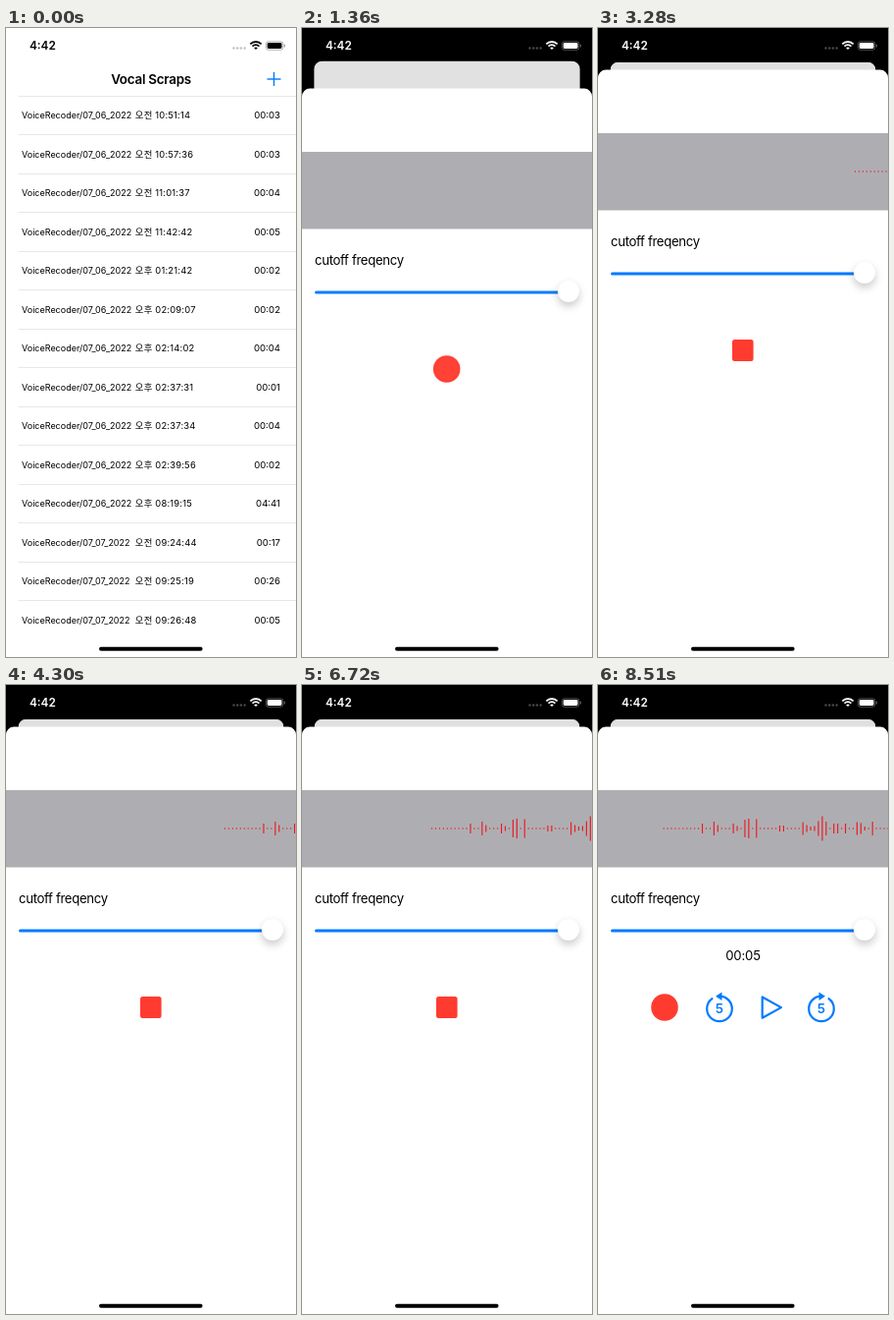
Animation of 296x640 px, one loop 8.62 s. Source, as an HTML page with a canvas:

```html
<!DOCTYPE html>
<html lang="en">
<head>
<meta charset="utf-8">
<title>Recorder</title>
<style>
html, body { margin: 0; height: 100%; overflow: hidden; background: #000; }
canvas { display: block; }
</style>
</head>
<body>
<canvas id="stage" width="296" height="640"></canvas>
<script>
const W = 296, H = 640, LOOP = 8620;
const ROW = 39.47, GAP = 3.947, SHEET_TOP = 42.6, CARD_TOP = 34.7;
const BLUE = '#007aff', RED = '#ff3b30';
const FONT = 'Inter, "Noto Sans CJK KR", "Noto Sans CJK", sans-serif';
const ctx = document.getElementById('stage').getContext('2d');

const memos = `06 오전 10:51:14 00:03
06 오전 10:57:36 00:03
06 오전 11:01:37 00:04
06 오전 11:42:42 00:05
06 오후 01:21:42 00:02
06 오후 02:09:07 00:02
06 오후 02:14:02 00:04
06 오후 02:37:31 00:01
06 오후 02:37:34 00:04
06 오후 02:39:56 00:02
06 오후 08:19:15 04:41
07 오전 09:24:44 00:17
07 오전 09:25:19 00:26
07 오전 09:26:48 00:05`.split('\n').map(line => line.split(' '));

// Loud samples by index; all others are drawn as dots
const peaks = {
  10: 10, 13: 14, 14: 7, 18: 10, 19: 5, 21: 18, 22: 20, 24: 19, 30: 6, 31: 6,
  36: 13, 37: 7, 38: 4, 39: 5, 40: 15, 41: 25, 42: 14, 44: 10, 45: 10,
  47: 10, 50: 13, 51: 11, 52: 4, 54: 14
};

function text(str, x, y, size, { align = 'left', weight = 400, color = '#000', spacing = 0 } = {}) {
  ctx.font = `${weight} ${size}px ${FONT}`;
  ctx.letterSpacing = spacing + 'px';
  ctx.textAlign = align;
  ctx.fillStyle = color;
  ctx.fillText(str, x, y);
}

function box(x, y, w, h, r, color) {
  ctx.fillStyle = color;
  ctx.beginPath();
  ctx.roundRect(x, y, w, h, r);
  ctx.fill();
}

function disc(x, y, r, color) {
  ctx.fillStyle = color;
  ctx.beginPath();
  ctx.arc(x, y, r, 0, 7);
  ctx.fill();
}

function arc(x, y, r, from, to) {
  ctx.beginPath();
  ctx.arc(x, y, r, from * Math.PI / 180, to * Math.PI / 180);
  ctx.stroke();
}

function poly(...points) {
  ctx.beginPath();
  points.forEach(([x, y]) => ctx.lineTo(x, y));
  ctx.closePath();
}

function statusBar(color) {
  text('4:42', 24, 22, 11.8, { weight: 600, color });
  for (let i = 0; i < 4; i++) disc(232.5 + i * 3.7, 20.5, 1.2, '#8888');
  ctx.strokeStyle = color;
  ctx.lineWidth = 1.8;
  arc(255, 22, 8, -135, -45);
  arc(255, 22, 4.9, -135, -45);
  ctx.lineWidth = 2.6;
  arc(255, 22, 1.3, -135, -45);
  ctx.globalAlpha = 0.4;
  ctx.lineWidth = 0.8;
  ctx.beginPath();
  ctx.roundRect(265.4, 13.8, 17.4, 8.4, 2.4);
  ctx.stroke();
  box(283.8, 16.4, 1.1, 3.2, 0.6, color);
  ctx.globalAlpha = 1;
  box(266.7, 15, 14.8, 6, 1.4, color);
}

function memoList(p, pressed) {
  const scale = 1 - 0.0853 * p;
  ctx.save();
  ctx.translate(W * (1 - scale) / 2, CARD_TOP * p);
  ctx.scale(scale, scale);
  ctx.beginPath();
  ctx.roundRect(0, 0, W, H, p ? 31 - 22.4 * p : 0);
  ctx.clip();
  ctx.fillStyle = '#fff';
  ctx.fillRect(0, 0, W, H);
  text('Vocal Scraps', W / 2, 56.5, 13.4, { align: 'center', weight: 600, spacing: -0.25 });

  ctx.globalAlpha = pressed ? 0.35 : 1;
  ctx.fillStyle = BLUE;
  ctx.fillRect(266.5, 51.3, 14, 1.4);
  ctx.fillRect(272.8, 45, 1.4, 14);
  ctx.globalAlpha = 1;

  memos.forEach(([day, half, time, length], i) => {
    const y = 69 + i * ROW;
    ctx.fillStyle = '#e2e2e4';
    ctx.fillRect(12.6, Math.round(y), W, 0.8);
    text(`VoiceRecoder/07_${day}_2022`, 16, y + 23.4, 9);
    text(`${half} ${time}`, 131.8, y + 23.4, 9.4, { spacing: 0.2 });
    text(length, 280, y + 23.4, 9.6, { align: 'right' });
  });
  ctx.fillStyle = `rgba(0, 0, 0, ${0.12 * p})`;
  ctx.fillRect(0, 0, W, H);
  ctx.restore();
}

function waveform(step) {
  const start = step < 39 ? 223.5 - 4.33 * (step - 18) : 132.5 - 4.09 * (step - 39);
  ctx.fillStyle = '#f0141e';
  for (let i = 0; start + i * GAP <= W; i++) {
    const h = peaks[i] || 1.3;
    ctx.fillRect(start + i * GAP - 0.55, 146 - h / 2, 1.1, h);
  }
}

function slider(p) {
  ctx.globalAlpha = p;
  box(13, 248.4, 259, 3.2, 1.6, BLUE);
  ctx.globalAlpha = 1;
  ctx.save();
  ctx.shadowColor = 'rgba(0, 0, 0, .22)';
  ctx.shadowBlur = 8;
  ctx.shadowOffsetY = 4;
  disc(272, 249, 11, '#fff');
  ctx.restore();
}

// dir is 1 for back, -1 for its mirror image
function skipIcon(x, dir) {
  ctx.save();
  ctx.translate(x, 329.4);
  text('5', 0, 5, 13.5, { align: 'center', weight: 600, color: BLUE });
  ctx.scale(dir, 1);
  ctx.lineWidth = 2.2;
  arc(0, 0, 12.8, -90, 234);
  ctx.fillStyle = BLUE;
  poly([-4, -12.6], [2.5, -16.8], [2.5, -8.4]);
  ctx.fill();
  ctx.restore();
}

function playback() {
  text('00:05', 148, 280, 13.2, { align: 'center', spacing: -0.2 });
  disc(68, 328, 13.8, RED);
  ctx.strokeStyle = BLUE;
  ctx.lineCap = ctx.lineJoin = 'round';
  skipIcon(124, 1);
  skipIcon(228, -1);
  ctx.lineWidth = 2.2;
  poly([167.7, 317.5], [167.7, 338.7], [187, 328.1]);
  ctx.stroke();
  ctx.lineCap = 'butt';
}

// Laid out at its resting place, then shifted down while it rises
function sheet(p, t) {
  const step = Math.floor((t - 2230) / 114);
  ctx.save();
  ctx.translate(0, Math.round((H - SHEET_TOP) * (1 - p)));
  box(0, SHEET_TOP, W, H, [8, 8, 0, 0], '#fff');
  ctx.fillStyle = '#aeaeb2';
  ctx.fillRect(0, 107, W, 78.5);
  text('cutoff freqency', 13, 222, 13.2, { spacing: -0.35 });
  slider(p);
  if (step >= 0) waveform(step);

  if (step >= 55) playback();
  else if (step >= 0) box(137, 317, 21.6, 22, 2.5, RED);
  else {
    ctx.globalAlpha = p;
    disc(147.7, 328, 13.8, t < 2030 ? RED : '#8a1c1a');
    ctx.globalAlpha = 1;
  }
  ctx.restore();
}

function rise(t) {
  if (t < 1020) return 0;
  if (t >= 2030) return 1;
  const held = 1020 + 112.5 * Math.min(4, Math.floor((t - 1020) / 112.5));
  const s = (held - 1005) * 0.015;
  return 1 - Math.exp(-s) * (1 + s);
}

function draw(t) {
  const p = rise(t);
  ctx.fillStyle = '#000';
  ctx.fillRect(0, 0, W, H);
  memoList(p, t >= 880);
  if (p) sheet(p, t);
  statusBar(p > 0.8 ? '#fff' : '#000');
  box(95, 629.7, 105.6, 4, 2, '#000');
}

const begin = performance.now();
function frame() {
  draw((performance.now() - begin) % LOOP);
  requestAnimationFrame(frame);
}
frame();
</script>
</body>
</html>
```
